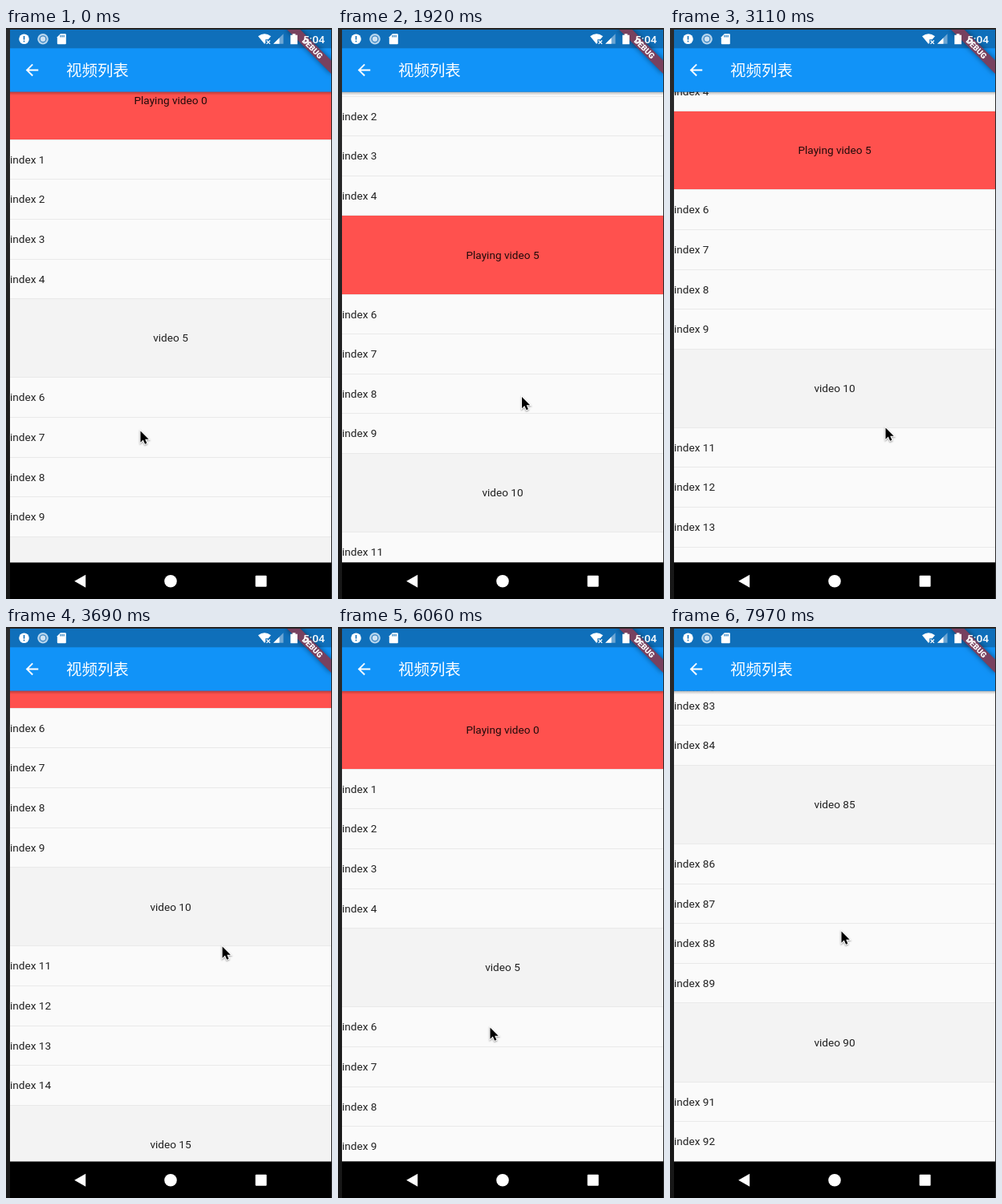
Animation of 406x712 px, one loop 8000 ms. Source, as an HTML page with a canvas:

```html
<!DOCTYPE html>
<html lang="zh">
<head>
<meta charset="utf-8">
<style>
html, body { margin: 0; width: 100%; height: 100%; overflow: hidden; background: #000; }
canvas { display: block; }
</style>
</head>
<body>
<canvas id="stage" width="406" height="712"></canvas>
<script>
const c = document.getElementById('stage').getContext('2d');
const LOOP = 8000, STEP = 147.6;
const LEFT = 5, RIGHT = 405, TOP = 79.6, BOTTOM = 666.5;
const DP = 400 / 411.4;
const ROW = 51 * DP, VIDEO = 101 * DP, GROUP = VIDEO + 4 * ROW;

// step, scroll, pointer x, pointer y, playing video
const keys = [
  [0, 38, 167, 502, 0], [5, 65, 167, 475, 0], [6, 65, 167, 475, 0],
  [7, 65, 167, 520, 5], [8, 65, 200, 536, 5], [10, 65, 200, 536, 5],
  [16, 218.5, 257, 383, 5], [18, 250, 260, 352, 5], [21, 272, 268, 498, 5],
  [25, 372.5, 269, 398, 5], [26, 440, 262, 345, 5], [27, 496, 255, 331, 5],
  [28, 496, 255, 331, 5], [29, 495, 250, 331, 10], [32, 490, 220, 336, 10],
  [33, 490, 220, 336, 10], [34, 478, 217, 348, 10], [35, 470, 216, 356, 10],
  [36, 470, 216, 356, 10], [38, 310, 205, 420, 10], [40, 0, 190, 490, 10],
  [41, 0, 189, 499, 0], [42, 0, 189, 499, 0], [43, 25, 190, 475, 0],
  [45, 240, 200, 390, 0], [48, 1500, 208, 440, 0], [54, 4948, 213, 379, 0]
];

function stateAt(step) {
  let i = keys.length - 1;
  while (keys[i][0] > step) i--;
  const a = keys[i], b = keys[i + 1] || a;
  const f = b === a ? 0 : (step - a[0]) / (b[0] - a[0]);
  const [, scroll, x, y] = a.map((v, j) => v + (b[j] - v) * f);
  return { scroll, x, y, playing: a[4] };
}

function rect(color, x, y, w, h) {
  c.fillStyle = color;
  c.fillRect(x, y, w, h);
}

function text(str, x, y, font, color, align = 'left') {
  c.font = font;
  c.fillStyle = color;
  c.textAlign = align;
  c.fillText(str, x, y);
}

function shape(d, x, y, color, scale = 1) {
  c.save();
  c.translate(x, y);
  c.scale(scale, scale);
  c.fillStyle = color;
  c.fill(new Path2D(d));
  c.restore();
}

function disc(x, y, r, color) {
  c.fillStyle = color;
  c.beginPath();
  c.arc(x, y, r, 0, 7);
  c.fill();
}

function list({ scroll, playing }) {
  const font = '13.62px Roboto, sans-serif', ink = 'rgba(0,0,0,.87)';
  rect('#fafafa', LEFT, TOP, 400, BOTTOM - TOP);
  for (let i = 5 * Math.floor(scroll / GROUP); ; i++) {
    const n = i % 5;
    const y = TOP - scroll + Math.floor(i / 5) * GROUP + (n && VIDEO + (n - 1) * ROW);
    if (y > BOTTOM) break;
    const h = n ? ROW : VIDEO, top = Math.round(y), end = Math.round(y + h) - 1;
    const base = y + (h - DP) / 2 + 4.7;
    if (n) {
      text('index ' + i, LEFT, base, font, ink);
    } else {
      const on = i === playing;
      rect(on ? '#ff514e' : '#f3f3f3', LEFT, top, 400, end - top);
      text((on ? 'Playing video ' : 'video ') + i, 205, base, font, ink, 'center');
    }
    rect('#e9e9e9', LEFT, end, 400, 1);
  }
}

function appBar() {
  const shade = c.createLinearGradient(0, 79, 0, 84);
  shade.addColorStop(0, 'rgba(0,0,0,.3)');
  shade.addColorStop(1, 'rgba(0,0,0,0)');
  rect(shade, LEFT, 79, 400, 5);
  rect('#1193f8', LEFT, 2, 400, TOP - 2);
  rect('#0f6fba', LEFT, 2, 400, 23.3);
  shape('M20 11H7.83l5.59-5.59L12 4l-8 8 8 8 1.41-1.41L7.83 13H20z', 20.8, 40.8, '#fff', DP);
  text('视频列表', 75, 60.2, '19.45px "Noto Sans CJK SC", "Noto Sans CJK", sans-serif', '#fff');
}

function banner() {
  c.save();
  c.beginPath();
  c.rect(LEFT, 2, 400, 90);
  c.clip();
  c.translate(RIGHT, 2);
  c.rotate(Math.PI / 4);
  c.scale(DP, DP);
  c.shadowColor = 'rgba(0,0,0,.5)';
  c.shadowBlur = 7;
  rect('#78415f', -40, 28, 80, 12);
  c.shadowColor = 'transparent';
  text('DEBUG', 0, 37.6, '900 10.2px Roboto, sans-serif', '#fff', 'center');
  c.restore();
}

function statusIcons() {
  disc(22.5, 13.8, 6.3, '#fff');
  rect('#0f6fba', 21.7, 10, 1.6, 4.6);
  rect('#0f6fba', 21.7, 15.8, 1.6, 1.6);
  disc(46, 13.8, 6.8, '#b9d7ee');
  disc(46, 13.8, 4.6, '#3b86c4');
  disc(46, 13.8, 3.2, '#cfe3f3');
  shape('M4 0H10Q11 0 11 1V12Q11 13 10 13H1Q0 13 0 12V4z', 63.8, 7.3, '#fff');
  for (let i = 0; i < 3; i++) rect('#0f6fba', 67.4 + i * 2.1, 8.9, 1.1, 2.6);

  shape('M0 3Q8-3 16 3L12.6 7H9.2V11.2L8 12.7z', 314, 7.3, '#fff');
  c.strokeStyle = '#fff';
  c.lineWidth = 1.3;
  c.stroke(new Path2D('M324.5 15.5l4.4 4.4m0-4.4l-4.4 4.4'));
  shape('M0 12.5L12.5 0V12.5z', 333, 7.3, '#6da6d4');
  shape('M0 7.5L7.5 0V7.5z', 333, 12.3, '#fff');
  shape('M0 1.5H2.5V0H6.2V1.5H8.7V13H0z', 354.3, 7.2, '#fff');
  text('5:04', 370, 18.8, '500 13.7px Roboto, sans-serif', '#fff');
}

function frameAndNav() {
  rect('#000', 0, BOTTOM, 406, 712 - BOTTOM);
  shape('M0 8L14 0V16z', 85.2, 681.8, '#fff');
  disc(205, 689.8, 7.8, '#fff');
  shape('M1 0H13Q14 0 14 1V13Q14 14 13 14H1Q0 14 0 13V1Q0 0 1 0z', 310.6, 682.8, '#fff');
  const side = c.createLinearGradient(0, 0, 0, 712);
  side.addColorStop(0, '#2b2b2c');
  side.addColorStop(1, '#171717');
  rect(side, 0, 0, LEFT, 712);
  rect('#252526', 0, 0, 406, 2);
  rect('#2a2a2b', RIGHT, 0, 1, 712);
}

function pointer(x, y) {
  const path = new Path2D('M0 0V14.2L3.3 11.1L5.6 16.3L7.9 15.3L5.7 10.3H10.2z');
  c.save();
  c.translate(x + .5, y + .5);
  c.shadowColor = 'rgba(0,0,0,.4)';
  c.shadowBlur = 2;
  c.shadowOffsetY = 1;
  c.strokeStyle = '#fff';
  c.lineWidth = 2;
  c.stroke(path);
  c.shadowColor = 'transparent';
  c.fillStyle = '#000';
  c.fill(path);
  c.restore();
}

function draw(now) {
  const state = stateAt(Math.floor((now % LOOP + 5) / STEP));
  list(state);
  appBar();
  banner();
  statusIcons();
  frameAndNav();
  pointer(state.x, state.y);
}

let start;
function tick(now) {
  start ??= now;
  draw(now - start);
  requestAnimationFrame(tick);
}
draw(0);
requestAnimationFrame(tick);
</script>
</body>
</html>
```
